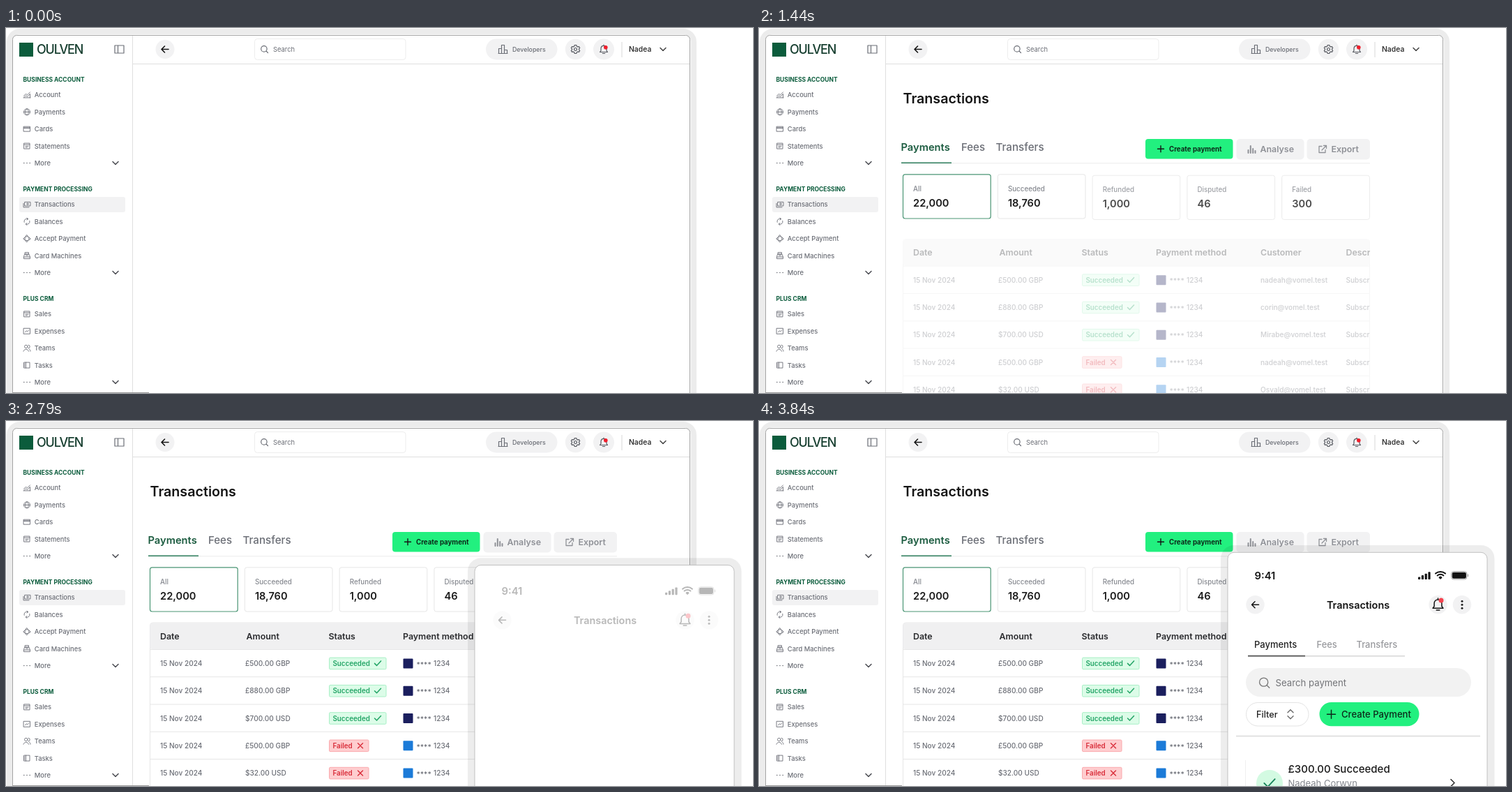
An HTML page that plays this animation: 1071 by 523 pixels, repeating every 6.24 s.

```html
<!DOCTYPE html>
<html lang="en">
<head>
<meta charset="utf-8">
<title>Transactions dashboard</title>
<style>
html, body { margin: 0; width: 100%; height: 100%; overflow: hidden; background: #fff; }
svg { display: block; width: 1071px; height: 523px; font-family: Inter, "Open Sans", sans-serif; }
</style>
</head>
<body>
<svg id="stage" viewBox="0 0 1071 523"></svg>
<script>
const LOOP = 6240, STEP = 30, FADE = 620;
const GREY = '#6b6e76', INK = '#151515', GREEN = '#22f07f', PALE = '#f2f2f3', DEEP = '#0b5c3c';

// Text is placed by its left edge and the middle of its capitals.
const text = (x, cy, str, size, weight = 500, fill = GREY, extra = '') =>
  `<text x="${x}" y="${cy + size * 0.364}" font-size="${size}" font-weight="${weight}" fill="${fill}" ${extra}>${str}</text>`;
const rect = (x, y, w, h, r, fill, stroke = 'none', sw = 1) =>
  `<rect x="${x}" y="${y}" width="${w}" height="${h}" rx="${r}" fill="${fill}" stroke="${stroke}" stroke-width="${sw}"/>`;
const disc = (x, y, r, fill) => `<circle cx="${x}" cy="${y}" r="${r}" fill="${fill}"/>`;
const icon = (x, y, d, stroke = GREY, sw = 1, scale = 1) =>
  `<path transform="translate(${x} ${y}) scale(${scale})" d="${d}" fill="none" stroke="${stroke}" stroke-width="${sw / scale}" stroke-linecap="round" stroke-linejoin="round"/>`;
const line = (x1, y1, x2, y2, stroke, sw = 1) =>
  `<path d="M${x1} ${y1}L${x2} ${y2}" stroke="${stroke}" stroke-width="${sw}"/>`;
const group = (id, body) => `<g id="${id}" opacity="0">${body}</g>`;

const ICON = {
  chart: 'M-5 4H5M-4.5 1.5L-1.5 -1.5 .5 0 4.5 -4M-4 3.5L-1.5 1 .5 2.5 4.5 -1.5V4',
  globe: 'M-4.5 0A4.5 4.5 0 1 1 4.5 0A4.5 4.5 0 1 1 -4.5 0H4.5M0 -4.5C-3 -2 -3 2 0 4.5C3 2 3 -2 0 -4.5',
  card: 'M-4.5 -3.5H4.5V3.5H-4.5ZM-4.5 -1.2H4.5M-4.5 -1.8H4.5',
  sheet: 'M-4 -4H4V4H-4ZM-4 -2H4M-2 .2H2M-2 2H.5',
  dots: 'M-4.3 0h.2M-.1 0h.2M4.1 0h.2',
  cash: 'M-3 -3.5H5V2H-3ZM-5 -1.5V4H3M2.2 -.8A1.2 1.2 0 1 1 -.2 -.8A1.2 1.2 0 1 1 2.2 -.8',
  cycle: 'M-3.9 1A4 4 0 0 1 1.5 -3.7M3.9 -1A4 4 0 0 1 -1.5 3.7M0 -5.2L1.8 -3.7 0 -2.2M0 5.2L-1.8 3.7 0 2.2',
  target: 'M0 -5L1.8 -2.8H-1.8ZM0 5L1.8 2.8H-1.8ZM-5 0L-2.8 -1.8V1.8ZM5 0L2.8 -1.8V1.8ZM-2.8 -1.8L-1.8 -2.8M2.8 -1.8L1.8 -2.8M-2.8 1.8L-1.8 2.8M2.8 1.8L1.8 2.8',
  till: 'M-2.5 -4.5H2.5V-2H-2.5ZM-3 -2H3L4.5 2V4.5H-4.5V2ZM-4.5 2H4.5M-1.5 0H1.5',
  graph: 'M-4.5 -4H4.5V4H-4.5ZM-2.5 1.5L-.8 -.5 .8 .7 2.8 -1.5',
  team: 'M1 -2.2A2.2 2.2 0 1 1 -3.4 -2.2A2.2 2.2 0 1 1 1 -2.2M-5 4.5C-4.5 .8 2 .8 2.5 4.5M2 -4.4A2.2 2.2 0 0 1 2 0M3 1.2C4.3 1.8 5 3 5 4.5',
  book: 'M-4 -4H4V4H-4ZM-1.5 -4V4M-4 -2h1M-4 0h1M-4 2h1',
  down: 'M-4 -2L0 2 4 -2',
  back: 'M5 0H-5M-.5 -4.5L-5 0 -.5 4.5',
  lens: 'M3.6 -.6A4.2 4.2 0 1 1 -4.8 -.6A4.2 4.2 0 1 1 3.6 -.6M2.4 2.4L5 5',
  bell: 'M-5.5 3.5H5.5L4 1.5V-1.5C4 -7 -4 -7 -4 -1.5V1.5ZM-1.7 5.5H1.7M0 -5.8V-7',
  bars: 'M-6.5 6H6.5M-6 6V-1H-2V6M-2 6V-6H2V6M2 6V1H6V6',
  check: 'M-4.5 0L-1.5 3 4.5 -3.5',
  cross: 'M-3.5 -3.5L3.5 3.5M3.5 -3.5L-3.5 3.5',
  plus: 'M-5 0H5M0 -5V5',
  share: 'M-1 -4H-5V5H4V1M1.5 -5H5.5V-1M5.5 -5L-1 1.5',
  gear: 'M2 0A2 2 0 1 1 -2 0A2 2 0 1 1 2 0M-1.3 -6H1.3L1.8 -4.3 3.3 -3.4 5 -4 6.2 -1.8 5 -.6V.6L6.2 1.8 5 4 3.3 3.4 1.8 4.3 1.3 6H-1.3L-1.8 4.3 -3.3 3.4 -5 4 -6.2 1.8 -5 .6V-.6L-6.2 -1.8 -5 -4 -3.3 -3.4 -1.8 -4.3Z'
};

function sidebar() {
  const sections = [
    [73.5, 'BUSINESS ACCOUNT', 'Account chart', 'Payments globe', 'Cards card', 'Statements sheet', 'More dots'],
    [230.5, 'PAYMENT PROCESSING', 'Transactions cash', 'Balances cycle', 'Accept Payment target', 'Card Machines till', 'More dots'],
    [387.5, 'PLUS CRM', 'Sales sheet', 'Expenses graph', 'Teams team', 'Tasks book', 'More dots']
  ];
  let out = rect(19, 242, 152, 22, 3, PALE);
  for (const [top, title, ...items] of sections) {
    out += text(24.5, top, title, 8.5, 700, DEEP);
    items.forEach((item, i) => {
      const y = top + 22.4 + i * 24.4, cut = item.lastIndexOf(' ');
      const kind = item.slice(cut + 1);
      out += icon(30, y, ICON[kind], GREY, kind === 'dots' ? 1.4 : 0.9);
      out += text(40.8, y, item.slice(0, cut), 9.4);
      if (kind === 'dots') out += icon(157, y, ICON.down, '#4a4c52', 1.5);
    });
  }
  return out;
}

function tablet() {
  return rect(5, 5, 981, 620, 15, '#fff', '#ececec', 8) +
    rect(9.5, 10.5, 971, 600, 6, '#fff', '#9a9a9a', 0.9) +
    line(10, 522.5, 205, 522.5, '#999') +
    line(181.5, 11, 181.5, 522, '#dfdfdf') + line(182, 51.5, 980, 51.5, '#dfdfdf') +
    rect(19, 21, 20, 20, 0, DEEP) +
    text(44, 30.5, 'OULVEN', 18, 500, '#173f30', 'letter-spacing="-1.2"') +
    icon(162.5, 30.5, 'M-6.5 -5.5H6.5V5.5H-6.5ZM-2 -5.5V5.5', GREY, 1.2) +
    sidebar() +
    disc(228, 30.5, 13.5, PALE) + icon(228, 30.5, ICON.back, INK, 1.6) +
    rect(356.5, 15.5, 216.5, 30, 4, '#fff', '#ededed') +
    icon(370.5, 30.5, ICON.lens, GREY, 1.2) + text(383, 31, 'Search', 9.4, 400) +
    rect(688, 15.5, 102.5, 30, 15, PALE) + icon(712.5, 30.5, ICON.bars, GREY, 1.2) +
    text(726, 30.5, 'Developers', 8.8) +
    disc(816.5, 30.5, 14.7, PALE) + icon(816.5, 30.5, ICON.gear, '#55585f', 1.2) +
    disc(857, 30.5, 15, PALE) + icon(857, 31, ICON.bell, '#55585f', 1.2) + disc(859.8, 27.8, 2.8, '#f01d2b') +
    line(883, 20, 883, 42, '#d8d8d8') +
    text(893, 30.5, 'Nadea', 10.4, 500, '#222') + icon(942, 30.5, ICON.down, '#444', 1.5);
}

function tabRow() {
  return text(203.5, 170.5, 'Payments', 14.7, 600, '#1c5c40') + text(290, 170.5, 'Fees', 15) + text(339.5, 170.5, 'Transfers', 15.2) +
    line(204, 193.8, 876, 193.8, '#ebebeb') + line(204, 193.3, 276, 193.3, '#2c7d5b', 1.5) +
    rect(554, 159, 125.5, 28.5, 4, GREEN) + icon(576, 173.2, ICON.plus, INK, 1.4, 0.9) +
    text(588, 173.3, 'Create payment', 9.7, 700, '#0c2a1a') +
    rect(684.5, 159, 97, 29.5, 5, PALE) + icon(706.5, 174, 'M-5 5V1M-1.7 5V-5M1.7 5V-1M5 5V2', '#8f9197', 2) +
    text(718.5, 173.5, 'Analyse', 12.4, 600, '#8f9197') +
    rect(785.5, 159, 90.5, 29.5, 5, PALE) + icon(808, 173.5, ICON.share, '#8f9197', 1.3) +
    text(820.5, 173.5, 'Export', 12.4, 600, '#8f9197');
}

function card(i) {
  const [label, count] = [['All', '22,000'], ['Succeeded', '18,760'], ['Refunded', '1,000'], ['Disputed', '46'], ['Failed', '300']][i];
  const x = 206.5 + i * 135.8;
  return rect(x, 209.8, 125.7, 63.2, 3, '#fff', i ? '#e6e6e6' : '#4a9574', i ? 1 : 1.2) +
    text(x + 14.6, 230.3, label, 9.8, 500, '#85888f') + text(x + 14.6, 250.2, count, 14.6, 600, '#1b1b1b');
}

function table() {
  const columns = [[221, 'Date'], [344.5, 'Amount'], [462.5, 'Status'], [569, 'Payment method'], [719, 'Customer'], [841.5, 'Description']];
  const rows = [
    ['£500.00 GBP', 1, 'nadeah@vomel.test'], ['£880.00 GBP', 1, 'corin@vomel.test'], ['$700.00 USD', 1, 'Mirabe@vomel.test'],
    ['£500.00 GBP', 0, 'nadeah@vomel.test'], ['$32.00 USD', 0, 'Osvald@vomel.test']
  ];
  let out = rect(206.5, 289, 669, 260, 4, '#fff', '#e6e6e6') + rect(206.5, 289, 669, 38.3, 4, '#f0f0f1');
  for (const [x, name] of columns) out += text(x, 308.2, name, 12.4, 600, '#2a2b2e');
  rows.forEach(([amount, ok, mail], i) => {
    const y = 347.4 + i * 39.3, tone = ok ? '#23a566' : '#d92d3a';
    out += line(207, y - 20, 875, y - 20, '#e6e6e6') +
      text(221, y, '15 Nov 2024', 10.1) + text(343, y, amount, 10.1) +
      rect(463.5, y - 8.3, ok ? 81.5 : 56.5, 16.6, 1.5, ok ? '#dcfce8' : '#fecdcf', ok ? '#a8efc6' : '#fba9ad') +
      text(468.5, y, ok ? 'Succeeded' : 'Failed', 9.8, 600, tone) +
      (ok ? icon(533, y, ICON.check, tone, 1.5) : icon(508, y, ICON.cross, tone, 1.4)) +
      rect(569.5, y - 7, 14, 14, 1, ok ? '#1b1f5e' : '#1c7bd8') +
      text(588.5, y + 1.5, '****', 10.2) + text(613, y, '1234', 10.1) +
      text(719, y, mail, 10.1) + text(841.5, y, 'Subscription', 10.1);
  });
  return `<g clip-path="url(#tableClip)">${out}</g>`;
}

function phoneHeader() {
  const bars = [0, 1, 2, 3].map(i => rect(945 + i * 4.8, 223.5 - i * 2.4, 3.2, 3.5 + i * 2.4, 0.8, '#111')).join('');
  const dots = [-5, 0, 5].map(d => disc(1008, 263.2 + d, 1.5, '#222')).join('');
  return text(710.5, 221.5, '9:41', 14.8, 600, INK) + bars +
    icon(977, 221, 'M-7 -2.5C-3 -6 3 -6 7 -2.5M-4.4 .4C-2 -1.8 2 -1.8 4.4 .4M-1.4 3.2C-.6 2.5 .6 2.5 1.4 3.2L0 4.6Z', '#111', 2) +
    rect(992.5, 215.5, 22.5, 11.5, 3.5, 'none', '#aaa') + rect(993.7, 216.7, 20.2, 9.1, 2.3, '#111') + line(1016.5, 219.5, 1016.5, 223, '#aaa', 1.3) +
    disc(711.5, 263.2, 13.2, PALE) + icon(711.5, 263.2, ICON.back, INK, 1.5) +
    text(859, 263.5, 'Transactions', 14.4, 600, INK, 'text-anchor="middle"') +
    disc(973.5, 263.2, 13.2, PALE) + icon(973.5, 263.5, ICON.bell, INK, 1.5, 1.35) + disc(978, 257, 3.5, '#f5434f') +
    disc(1008, 263.2, 13.2, PALE) + dots;
}

function phoneTools() {
  return text(710, 320.5, 'Payments', 13, 500, '#222') + text(799.5, 320.5, 'Fees', 12.9, 500, '#98999d') + text(856.5, 320.5, 'Transfers', 12.9, 500, '#98999d') +
    line(701, 336.8, 926, 336.8, '#d6d6d6', 1.5) + line(701, 336.6, 783, 336.6, '#555', 1.6) +
    rect(698, 354, 323, 41, 20.5, '#f2f2f2') + icon(724.5, 375, ICON.lens, '#777', 1.3, 1.45) +
    text(740.5, 374.7, 'Search payment', 13.2, 400, '#737478') +
    rect(698.5, 403.5, 89.5, 33.5, 16.7, '#fff', '#e3e3e3') + text(713, 420.3, 'Filter', 12.7, 500, '#222') +
    icon(762, 420.3, 'M-4 -2.5L0 -6.5 4 -2.5M-4 2.5L0 6.5 4 2.5', '#666', 1.3) +
    rect(803.5, 403, 143, 34.2, 17.1, GREEN) + icon(820.5, 420.3, ICON.plus, '#0c2a1a', 1.5, 1.2) +
    text(835, 420.5, 'Create Payment', 13.1, 500, '#0c2a1a') + line(684, 451.5, 1034, 451.5, '#d9d9d9', 1.5);
}

function phoneList() {
  return line(697.5, 486, 697.5, 560, '#efefef') + disc(732, 519, 19, '#d3fae2') + icon(732, 519, ICON.check, '#17845a', 1.8, 1.7) +
    text(758.5, 498.5, '£300.00 Succeeded', 15, 500, '#1b1b1b') + text(758.5, 519.5, 'Nadeah Corwyn', 13, 400, '#85888f') +
    icon(994.5, 518.5, 'M-2.5 -5L2.5 0 -2.5 5', '#333', 1.6);
}

document.getElementById('stage').innerHTML =
  '<clipPath id="tableClip"><path d="M200 280H876V570H200Z"/></clipPath>' + tablet() +
  group('heading', text(206.5, 100.5, 'Transactions', 19.7, 600, INK)) +
  group('tabs', tabRow()) +
  group('cardsA', card(0) + card(1)) +
  group('cardsB', card(2) + card(3) + card(4)) +
  group('table', table()) +
  group('phone', rect(662, 178, 392.5, 420, 19, 'rgba(0,0,0,.07)') + rect(672, 188.3, 372, 400, 9, '#fff', '#b4b4b4', 0.8)) +
  group('phoneHeader', phoneHeader()) + group('phoneTools', phoneTools()) + group('phoneList', phoneList());

// Each entry: id, start time, distance to rise.
const reveals = [
  ['heading', 30, 30], ['tabs', 320, 30], ['cardsA', 610, 30], ['cardsB', 955, 30], ['table', 1240, 30],
  ['phoneHeader', 2605, 45], ['phoneTools', 2880, 45], ['phoneList', 3205, 45]
];
const progress = (t, start, span) => Math.min(1, Math.max(0, (t - start) / span));
function pose(id, opacity, dy) {
  const el = document.getElementById(id);
  el.setAttribute('opacity', opacity);
  el.setAttribute('transform', `translate(0 ${dy})`);
}

function draw(now) {
  const t = Math.floor((now % LOOP) / STEP) * STEP;
  for (const [id, start, rise] of reveals) {
    const p = progress(t, start, FADE);
    pose(id, p, rise * (1 - p) ** 2);
  }
  const p = progress(t, 2115, 1296);
  pose('phone', p > 0 ? 1 : 0, 345 * (1 - p) ** 4);
  requestAnimationFrame(draw);
}
draw(performance.now());
</script>
</body>
</html>
```
